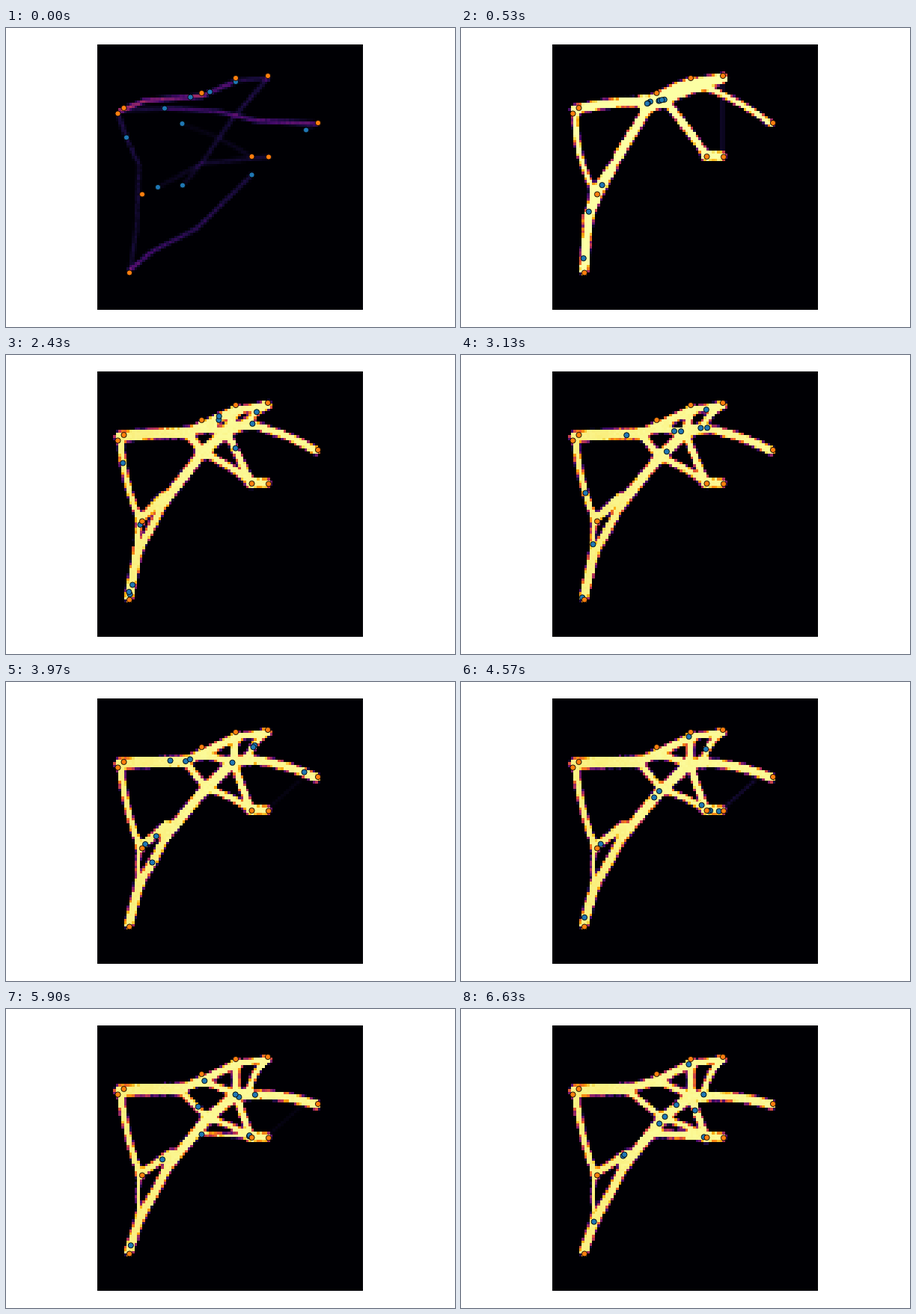
These frames come from a looping animation (600x400 px, 6660 ms). An HTML page with a canvas:

```html
<!DOCTYPE html>
<html lang="en">
<head>
<meta charset="utf-8">
<title>Network growth</title>
<style>
  html, body { margin: 0; width: 100%; height: 100%; overflow: hidden; background: #fff; }
  canvas { display: block; width: 600px; height: 400px; }
</style>
</head>
<body>
<canvas id="stage" width="600" height="400"></canvas>
<script>
const LOOP = 6660, STEP = 100 / 3, LAST = 199, GROWN = 16;
const LEFT = 122, TOP = 22, SIDE = 355, CELLS = 100, CELL = SIDE / CELLS;
const ctx = document.getElementById('stage').getContext('2d');
const grid = document.createElement('canvas');
grid.width = grid.height = CELLS;
const gridCtx = grid.getContext('2d');
const image = gridCtx.createImageData(CELLS, CELLS);

const clamp = v => Math.max(0, Math.min(1, v));
const mix = (a, b, t) => a + (b - a) * t;
const easeOut = (t, power) => 1 - (1 - t) ** power;
const hash = (a, b) => {
  let n = Math.imul(a + 101, 374761393) ^ Math.imul(b + 17, 668265263);
  n = Math.imul(n ^ (n >>> 13), 1274126177);
  return ((n ^ (n >>> 16)) >>> 0) / 4294967296;
};

// Inferno colour map
const STOPS = ['000004', '160b39', '420a68', '6a176e', '932667', 'bc3754',
  'dd513a', 'f37819', 'fca50a', 'f6d746', 'fcffa4']
  .map(h => [0, 2, 4].map(i => parseInt(h.slice(i, i + 2), 16)));
const PALETTE = Array.from({ length: 256 }, (_, i) => {
  const p = i / 255 * 10, k = Math.min(9, Math.floor(p));
  return STOPS[k].map((c, j) => mix(c, STOPS[k + 1][j], p - k));
});

const HUBS = [[149.5, 114.5], [157.5, 107], [261.5, 87], [307, 67], [350, 64],
  [417, 127], [328.5, 172], [351, 172.5], [182, 222.5], [165, 327.5]];

// Junctions: first place, last place, ease-out power in x and y
const FAST = 2.6;
const fixed = (x, y) => [[x, y], [x, y], [1, 1]];
const NODES = {
  P: fixed(153, 109), L: fixed(179, 221), B: fixed(164, 324), R: fixed(414, 128),
  S: fixed(349, 67), G: fixed(328, 171), F: fixed(348, 171), W: fixed(258, 166),
  A: [[245, 99], [220, 107], [.4, FAST]],
  U: [[262, 97], [262, 96], [1, 1]],
  T: [[307, 75], [307, 73], [1, 1]],
  M: [[272, 96], [308, 116], [FAST, 1]],
  C: [[320, 77], [324, 117], [FAST, 1.3]],
  D: [[252, 103], [270, 146], [FAST, FAST]],
  E: [[210, 172], [219, 208], [1, FAST]],
  J: [[202, 186], [222, 193], [1.3, 1.3]],
  H: [[170, 255], [180, 280], [FAST, 1]]
};

// Links: ends, half width first and last, sideways bend first and last, step of birth
const LINKS = [
  ['PA', 6.5, 7.8, -3, 0], ['AU', 8, 6], ['UT', 8, 5.5, -3, 0], ['TS', 7, 4.5],
  ['TM', 6, 5], ['UM', 8, 4.5], ['MC', 8, 7, -2, 0], ['CS', 5, 4.2, 0, -5],
  ['CR', 4, 6, -4, -4], ['MD', 8.5, 6.8], ['AD', 8, 4.2], ['DE', 6.5, 6.8],
  ['LJ', 6.5, 5.2], ['EH', 4, 6, 0, -1], ['LH', 6.5, 2.4, 0, 3], ['HB', 6.2, 6.2],
  ['PL', 3.8, 4.4, 8, 4], ['DG', 6, 4.2, -2, -2, 22], ['MG', 5.2, 4.8, -1, 1],
  ['WG', 5, 5, 0, 0, 165], ['GF', 6.5, 6.2]
];

// First trail of each walker: strength, then its way; the walker stands at the end
const P = [154, 110], S = [350, 67], B = [166, 323];
const TRAILS = [
  [.3, P, [185, 97], [262, 91], [307, 72]],
  [.18, P, [185, 98], [262, 91], [272.5, 85.5]],
  [.14, S, [307, 70], [262, 91], [246.5, 92.5]],
  [.2, [415, 128], [335, 124], [285, 112], [212, 107.5]],
  [.1, P, [230, 107], [285, 112], [335, 124], [414, 128], [401, 136.5]],
  [.05, HUBS[6], [280, 145], [235.5, 128]],
  [.12, HUBS[0], [161, 146.5], [178, 184], [174, 270], B, [174, 270], [178, 184], [161, 146.5]],
  [.09, HUBS[7], [262, 181], [203, 213]],
  [.12, S, [302, 122], [262, 180], [236, 210.5]],
  [.24, B, [197, 298], [255, 268], [328.5, 196.5]]
].map(([power, ...points]) => ({ ...shape(points, 2.8), power }));

function shape(points, width) {
  const xs = points.map(p => p[0]), ys = points.map(p => p[1]);
  const pad = width + 8;
  return {
    points, width,
    x0: Math.min(...xs) - pad, x1: Math.max(...xs) + pad,
    y0: Math.min(...ys) - pad, y1: Math.max(...ys) + pad
  };
}

function buildLinks(step, age) {
  const place = name => {
    const [from, to, powers] = NODES[name];
    return from.map((v, i) => mix(v, to[i], easeOut(age, powers[i])));
  };
  const late = easeOut(age, FAST);
  return LINKS.filter(l => step >= (l[5] || 0)).map(([ends, w0, w1, b0 = 0, b1 = 0, birth]) => {
    const [ax, ay] = place(ends[0]), [bx, by] = place(ends[1]);
    const push = 2 * mix(b0, b1, late) / (Math.hypot(bx - ax, by - ay) || 1);
    const cx = (ax + bx) / 2 - (by - ay) * push, cy = (ay + by) / 2 + (bx - ax) * push;
    const n = push ? 6 : 1;
    const points = Array.from({ length: n + 1 }, (_, k) => {
      const t = k / n;
      return [mix(mix(ax, cx, t), mix(cx, bx, t), t), mix(mix(ay, cy, t), mix(cy, by, t), t)];
    });
    const open = birth ? clamp((step - birth) / 25) : 1;
    return shape(points, mix(w0, w1, late) * open);
  });
}

const inside = (s, x, y) => x > s.x0 && x < s.x1 && y > s.y0 && y < s.y1;

// Distance to a polyline and how far along it the nearest point lies
let along = 0;
function distance(points, x, y) {
  let best = 1e9;
  const n = points.length - 1;
  for (let k = 0; k < n; k++) {
    const [ax, ay] = points[k], dx = points[k + 1][0] - ax, dy = points[k + 1][1] - ay;
    const t = clamp(((x - ax) * dx + (y - ay) * dy) / (dx * dx + dy * dy || 1));
    const ex = x - ax - dx * t, ey = y - ay - dy * t, d = ex * ex + ey * ey;
    if (d < best) { best = d; along = (k + t) / n; }
  }
  return Math.sqrt(best);
}

// Smooth union, rounds the corners where links meet
function blend(a, b) {
  const k = 5, h = Math.max(k - Math.abs(a - b), 0) / k;
  return Math.min(a, b) - h * h * k / 4;
}

const cover = (d, soft) => clamp(.5 - d / soft);

function drawField(step, age, links) {
  const rise = clamp(step / 6), fade = clamp(1 - step / 12);
  const dim = .05 * clamp((step - GROWN) / 60);
  const weak = [
    { ...shape([[349, 70], [349, 165]], 2), power: .1 * rise * clamp(1 - age * 6) },
    { ...shape([[354, 166], [392, 132]], 2), power: .1 * Math.exp(-(((age - .72) / .14) ** 2)) }
  ].filter(w => w.power > .005);

  for (let j = 0; j < CELLS; j++) {
    for (let i = 0; i < CELLS; i++) {
      const x = LEFT + (i + .5) * CELL, y = TOP + (j + .5) * CELL;
      const grain = hash(i, j);
      let v = 0;
      if (rise) {
        let d = 99;
        for (const l of links) if (inside(l, x, y)) d = blend(d, distance(l.points, x, y) - l.width);
        const tone = 1 - dim * (.35 + .4 * clamp((250 - x) / 60) + .3 * (grain - .5));
        v = cover(d + (grain - .5), 2.8) * tone * rise;
        for (const w of weak) {
          if (inside(w, x, y)) v = Math.max(v, w.power * cover(distance(w.points, x, y) - w.width, 3));
        }
      }
      if (fade) {
        let glow = 0;
        for (const s of TRAILS) {
          if (!inside(s, x, y)) continue;
          const c = cover(distance(s.points, x, y) - s.width, 4);
          glow += c * s.power * (1 - .6 * along);
        }
        v = Math.max(v, glow * fade * (.85 + .3 * grain));
      }
      const o = 4 * (j * CELLS + i);
      image.data.set(PALETTE[Math.round(clamp(v) * 255)], o);
      image.data[o + 3] = 255;
    }
  }
  gridCtx.putImageData(image, 0, 0);
  ctx.imageSmoothingEnabled = false;
  ctx.drawImage(grid, LEFT, TOP, SIDE, SIDE);
}

// Walkers cover many links per step, so each step finds them anywhere on the network
function walkers(step, links) {
  if (step === 0) return TRAILS.map(t => t.points[t.points.length - 1]);
  return TRAILS.map((_, n) => {
    const p = links[Math.floor(hash(step, n) * links.length)].points;
    const pos = hash(step, n + 40) * (p.length - 1), k = Math.floor(pos);
    return [0, 1].map(a => mix(p[k][a], p[k + 1][a], pos - k) + (hash(step, n + 80 + 40 * a) - .5) * 5);
  });
}

function drawDots(spots, color) {
  ctx.fillStyle = color;
  ctx.strokeStyle = '#000';
  ctx.lineWidth = .9;
  for (const [x, y] of spots) {
    ctx.beginPath();
    ctx.arc(x, y, 3.6, 0, 2 * Math.PI);
    ctx.fill();
    ctx.stroke();
  }
}

function draw(step) {
  const age = clamp((step - GROWN) / (LAST - GROWN));
  const links = buildLinks(step, age);
  ctx.fillStyle = '#fff';
  ctx.fillRect(0, 0, 600, 400);
  drawField(step, age, links);
  drawDots(walkers(step, links), '#1f77b4');
  drawDots(HUBS, '#ff7f0e');
}

const start = performance.now();
let shown = -1;
function tick() {
  const time = Math.floor(((performance.now() - start) % LOOP) / 10) * 10;
  const step = Math.min(LAST, Math.floor((time + 5) / STEP));
  if (step !== shown) draw(shown = step);
  requestAnimationFrame(tick);
}
tick();
</script>
</body>
</html>
```
